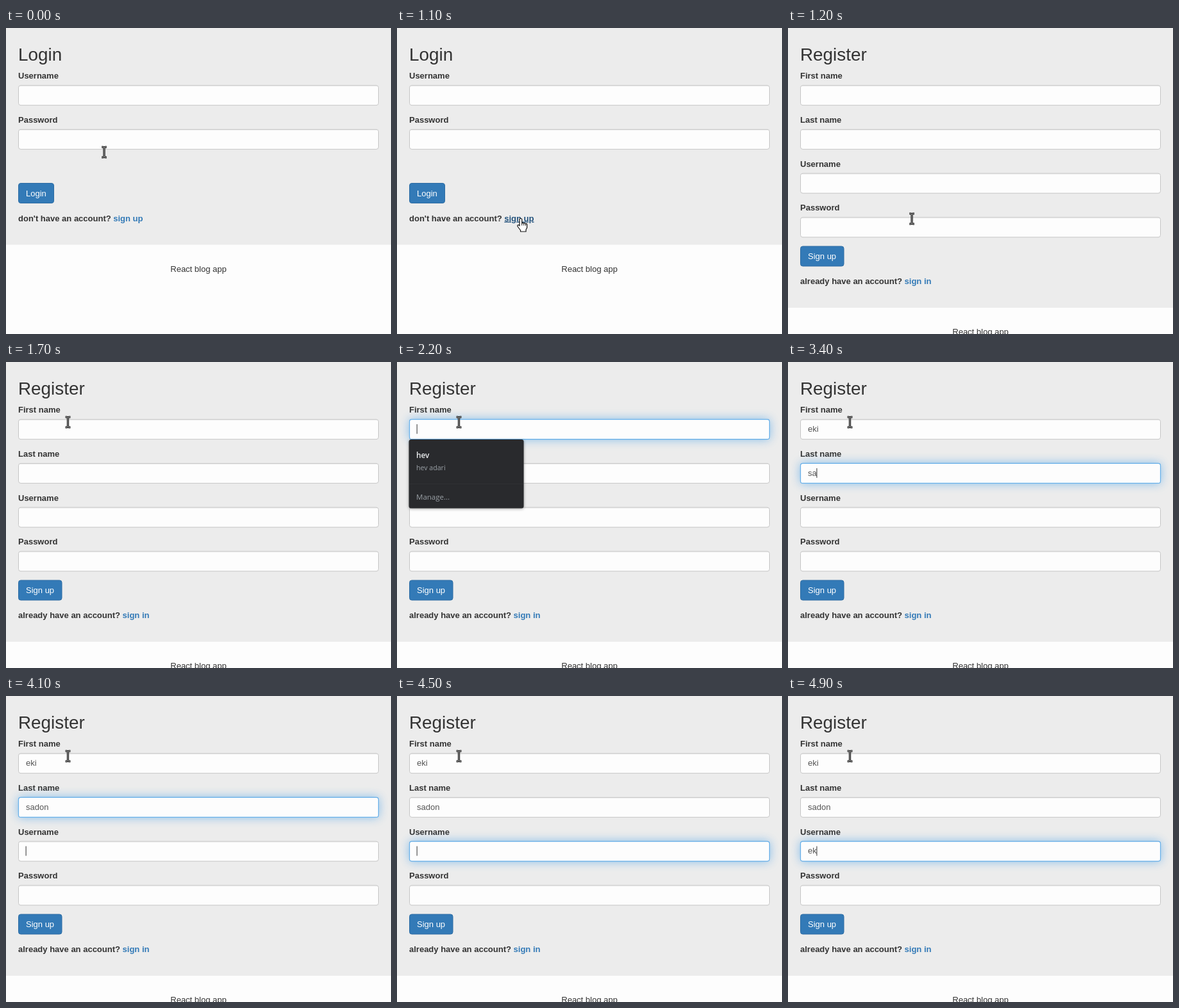
An HTML page that plays this animation: 600x478 px, repeating every 5 s.

```html
<!DOCTYPE html>
<html lang="en">
<head>
<meta charset="utf-8">
<title>Blog sign up</title>
<style>
html, body { margin: 0; width: 100%; height: 100%; overflow: hidden; background: #fdfdfd; }
svg { display: block; width: 100%; height: 100%; }
text { font: 13px "Liberation Sans", Arial, sans-serif; fill: #333; white-space: pre; }
.head { font-size: 27.86px; }
.bold { font-weight: 700; }
.link { fill: #337ab7; }
.over { fill: #23527c; text-decoration: underline; }
.btn { fill: #337ab7; stroke: #2e6da4; }
.white { fill: #fff; }
.box { fill: #fdfdfd; stroke: #c6c6c6; }
.inset { stroke: #000; stroke-opacity: .07; }
.glow { fill: #fdfdfd; stroke: #66afe9; stroke-width: 1.2; filter: drop-shadow(0 0 7.4px rgba(102, 175, 233, .75)); }
.typed { fill: #555; }
.menu text { font-family: "Open Sans", "Noto Sans", sans-serif; fill: #9aa0a6; }
.menu rect { fill: #292a2d; filter: drop-shadow(0 1px 2px rgba(0, 0, 0, .35)); }
</style>
</head>
<body>
<svg id="stage" viewBox="0 0 600 478"></svg>
<script>
const LOOP = 5000, STEP = 100, PITCH = 68.7;
const SIGNUP_AT = 1200, MENU = [2000, 2500];

// Focus span and [time, text] keystrokes of each sign-up field
const FIELDS = [
  { from: 2000, to: 3100, keys: [[2500, "e"], [2700, "ek"], [2800, "eki"]] },
  { from: 3100, to: 4100, keys: [[3300, "s"], [3400, "sa"], [3600, "sad"], [3700, "sado"], [3800, "sadon"]] },
  { from: 4100, to: 9999, keys: [[4600, "e"], [4800, "ek"]] }
];

// Pointer stops: time, x, y
const PATH = [[0, 153, 194], [200, 153, 194], [900, 193, 298], [1250, 193, 298], [1700, 96.5, 94], [LOOP, 96.5, 94]];

const label = (x, y, s, cls = "", extra = "") => `<text x="${x}" y="${y}" class="${cls}" ${extra}>${s}</text>`;
const rect = (x, y, w, h, cls, extra = "") =>
  `<rect x="${x}" y="${y}" width="${w}" height="${h}" rx="3.5" class="${cls}" ${extra}/>`;
const fieldTop = i => 89.7 + i * PITCH;

function field(name, i) {
  const y = fieldTop(i);
  return label(19, y - 10.5, name, "bold") + rect(19.5, y, 561, 31, "box") +
    `<path class="inset" d="M22 ${y + 1}H578"/>`;
}

function page(id, title, names, bottom, button, ask, link) {
  return `<g id="${id}"><rect width="600" height="${bottom}" fill="#ececec"/>` +
    label(19, 51, title, "head") + names.map(field).join("") +
    rect(19.5, button.y, button.w, 31, "btn") + label(31, button.y + 20, button.text, "white") +
    label(19, button.y + 59, `${ask} <tspan class="link">${link}</tspan>`, "bold") +
    label(300, bottom + 42, "React blog app", "", 'text-anchor="middle"') + "</g>";
}

const beam = "M-4 -8H-1.5L0 -7L1.5 -8H4M0 -7V7M-4 8H-1.5L0 7L1.5 8H4";
const hand = "M-2 1.5Q-2 -.5 0 -.5Q1.7 -.5 1.7 1.5V7Q3 5.5 4.7 7.2Q6 6 7.4 7.8Q9.6 7 9.6 9.5V14L8 17V20H-.5V18" +
  "L-4.7 12.5Q-6 10.5 -4.5 9.8Q-3.3 9.3 -2 11Z";
const arrow = "M0 0V15.5L3.6 12.2L6 17.8L8.4 16.8L6 11.4H10.8Z";

document.getElementById("stage").innerHTML =
  page("login", "Login", ["Username", "Password"], 338.5,
    { y: 242.5, w: 55, text: "Login" }, "don't have an account?", "sign up") +
  page("signup", "Register", ["First name", "Last name", "Username", "Password"], 437,
    { y: 341, w: 67.5, text: "Sign up" }, "already have an account?", "sign in") +
  `<g id="live">` +
  FIELDS.map((f, i) => rect(19.5, fieldTop(i), 561, 31, "glow") +
    label(31, fieldTop(i) + 19.3, "", "typed")).join("") +
  `<rect id="caret" width="1.1" height="15" fill="#444"/></g>` +
  `<g id="menu" class="menu">${rect(18.5, 121, 179, 107.5, "")}` +
  `<path d="M19 190.5H197" stroke="#303134"/>` +
  label(30, 150, "hev", "", 'style="font-size:11.8px;font-weight:600;fill:#eceef0"') +
  label(30, 169, "hev adari", "", 'style="font-size:10.6px"') +
  label(30, 214.5, "Manage...", "", 'style="font-size:11.5px"') + "</g>" +
  `<g id="pointer" fill="none">` +
  `<g id="beam"><path d="${beam}" stroke="#111" stroke-width="3.2"/><path d="${beam}" stroke="#ddd" stroke-width=".8"/></g>` +
  `<g id="hand"><path d="${hand}" fill="#fff" stroke="#111" stroke-width="1.2" stroke-linejoin="round"/>` +
  `<path d="M1.7 7V10.5M4.7 7.2V10.5M7.4 7.8V10.8" stroke="#111"/></g>` +
  `<path id="arrow" d="${arrow}" fill="#fff" stroke="#111" stroke-linejoin="round"/></g>`;

const el = id => document.getElementById(id);
const show = (node, on) => { node.style.display = on ? "" : "none"; };
const clamp = v => Math.max(0, Math.min(1, v));
const glows = document.querySelectorAll(".glow");
const typed = document.querySelectorAll(".typed");
const signUpLink = document.querySelector("#login .link");

function pointerAt(t) {
  const i = PATH.findIndex(p => p[0] > t);
  const [t0, x0, y0] = PATH[i - 1], [t1, x1, y1] = PATH[i];
  const k = (t - t0) / (t1 - t0), e = k * k * (3 - 2 * k);
  return [x0 + (x1 - x0) * e, y0 + (y1 - y0) * e];
}

function pointerKind(t, y) {
  if (t < 300) return "beam";
  if (t < SIGNUP_AT) return y > 290 ? "hand" : "arrow";
  const inside = y - fieldTop(0) - Math.floor((y - fieldTop(0)) / PITCH) * PITCH;
  return inside < 31 ? "beam" : "arrow";
}

function drawFields(t) {
  show(el("caret"), false);
  FIELDS.forEach((f, i) => {
    glows[i].style.opacity = clamp((t - f.from) / 150) - clamp((t - f.to) / 150);
    const key = f.keys.filter(k => k[0] <= t).pop() || [f.from, ""];
    typed[i].textContent = key[1];
    if (t < f.from || t >= f.to) return;
    const caret = el("caret");
    caret.setAttribute("x", 30.6 + (key[1] ? typed[i].getComputedTextLength() : 0));
    caret.setAttribute("y", fieldTop(i) + 7.5);
    show(caret, (t - key[0]) % 1000 < 500);
  });
}

function draw(t) {
  const joined = t >= SIGNUP_AT;
  show(el("login"), !joined);
  show(el("signup"), joined);
  show(el("live"), joined);
  show(el("menu"), t >= MENU[0] && t < MENU[1]);
  drawFields(t);
  const [x, y] = pointerAt(t), kind = pointerKind(t, y);
  el("pointer").setAttribute("transform", `translate(${x} ${y})`);
  for (const k of ["beam", "hand", "arrow"]) show(el(k), k === kind);
  signUpLink.classList.toggle("over", kind === "hand");
}

const start = performance.now();
function tick(now) {
  const t = Math.max(0, now - start) % LOOP;
  draw(Math.floor(t / STEP) * STEP);
  requestAnimationFrame(tick);
}
draw(0);
requestAnimationFrame(tick);
</script>
</body>
</html>
```
